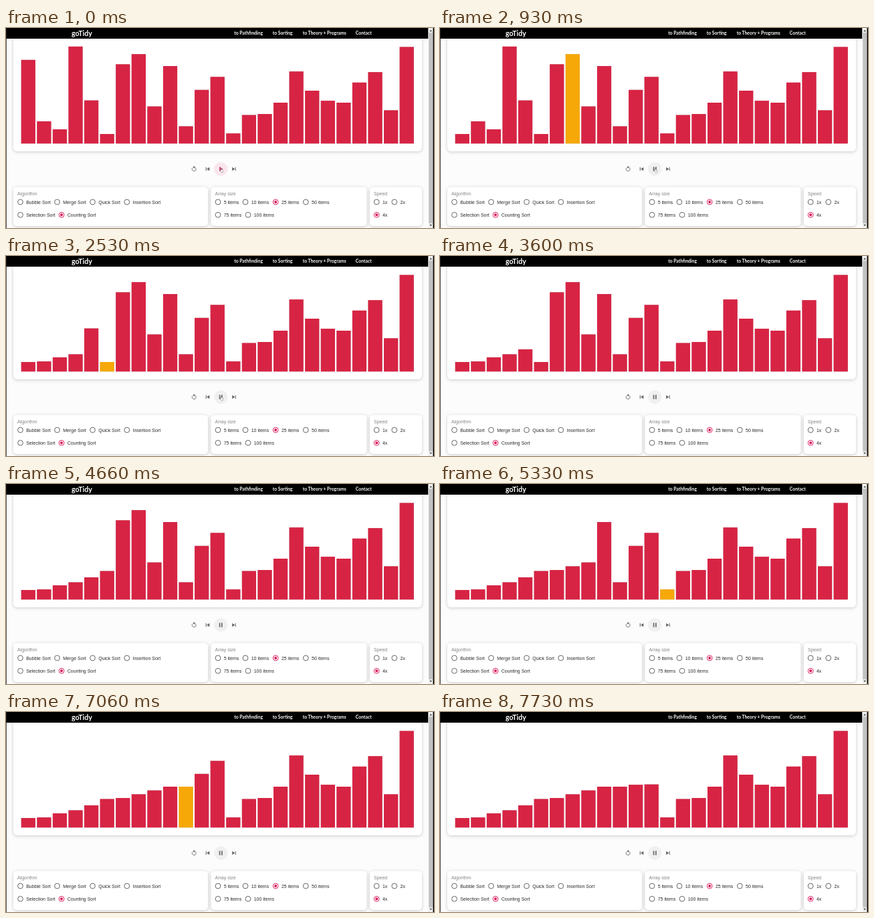
Write an HTML page that moves like this. It is 640 px wide and 300 px high and loops after 8000 ms.

```html
<!DOCTYPE html>
<html lang="en">
<head>
<meta charset="utf-8">
<title>Sorting visualizer</title>
<style>
  html, body { margin: 0; width: 100%; height: 100%; overflow: hidden; background: #fcfcfc; }
  svg { display: block; }
  text { font: 7px "Liberation Sans", Arial, sans-serif; fill: #2a2a2a; }
  .label { fill: #858585; }
  .nav text { font: 700 6.8px Lato, sans-serif; fill: #fff; text-anchor: middle; }
  .nav .brand { font-size: 10.6px; text-anchor: start; }
  .card { fill: #fff; filter: drop-shadow(0 1px 2.5px #0003); }
  .ring { fill: none; stroke: #555; stroke-width: .9; }
  .on { stroke: #d80d57; }
  .dot { fill: #d80d57; }
  .icon { fill: #666; }
  #bars { filter: drop-shadow(0 0 .6px #0004); }
</style>
</head>
<body>
<svg id="stage" width="640" height="300" viewBox="0 0 640 300">
  <rect class="card" x="11" y="-10" width="611" height="195" rx="6"/>
  <g id="bars"></g>

  <g class="nav">
    <rect width="631.5" height="16"/>
    <text class="brand" x="98" y="12">goTidy</text>
    <text x="362.6" y="10.3">to Pathfinding</text>
    <text x="413.7" y="10.3">to Sorting</text>
    <text x="476.2" y="10.3">to Theory + Programs</text>
    <text x="534.8" y="10.3">Contact</text>
  </g>

  <g class="icon">
    <path d="M279.2 209.4A3 3 0 1 0 281.6 208.7" fill="none" stroke="#666" stroke-width=".9"/>
    <path d="M282 206.7v4l-2.4-2z"/>
    <path d="M298.7 208.7h1v5.6h-1zM304.3 208.7v5.6l-4.2-2.8z"/>
    <path d="M342.7 208.7h1v5.6h-1zM338.2 208.7v5.6l4.2-2.8z"/>
  </g>
  <circle id="button" cx="321.2" cy="211.5" r="10.2"/>
  <path id="play" d="M319.3 208v7l5-3.5z" fill="#c42a58"/>
  <path id="pause" d="M318.7 208.2h1.8v6.6h-1.8zM322 208.2h1.8v6.6h-1.8z" fill="#707070"/>
  <path id="cursor" d="M321.2 210.6q.7-.6 1.1 0v2l2 .5q.6.3.4 1.2l-.5 2.2h-2.2l-1.8-2.4q.2-.7 1 0z"
        fill="#fff" stroke="#444" stroke-width=".4"/>

  <g id="options"></g>

  <rect width=".8" height="300" fill="#222"/>
  <rect x="631.5" width="7" height="300" fill="#f1f1f1"/>
  <rect x="632.3" y="7" width="5.6" height="286" fill="#c1c1c1"/>
  <path d="M633.2 5.2h4l-2-2.4zM633.2 294.8h4l-2 2.4z" fill="#505050"/>
  <rect x="638.5" width="1.5" height="300"/>
</svg>
<script>
const $ = id => document.getElementById(id);
const LOOP = 8000, TICKS_PER_MS = 0.015, BASE = 173.3, PITCH = 23.58;
const RED = '#d72444', ORANGE = '#f6a809';

// Top edge of each unsorted bar.
const tops = [47.8, 140, 152, 27.8, 108.6, 159, 54.4, 39.2, 117.6, 57.1, 147.4, 92.8, 73.3,
  158.1, 130.5, 129, 112, 65.2, 94, 109.1, 112, 81.8, 66.2, 123.4, 28.4];
const sorted = [...tops].sort((a, b) => b - a);
// Tick at which each sorted value is written back, from the left.
const writes = [6, 16, 24, 37, 44, 62, 71, 77, 85, 93, 106, 110, 114];
// Highlight sweeps: first bar, start tick, end tick.
const sweeps = [[0, 1, 7], [1, 11, 22], [2, 24, 36], [3, 37, 40], [4, 47, 54], [6, 62, 67],
  [7, 71, 74], [7, 77, 82], [8, 85, 86], [9, 93, 97], [10, 106, 109], [11, 110, 113], [12, 114, 116]];

function add(parent, tag, attrs, text = '') {
  const node = document.createElementNS('http://www.w3.org/2000/svg', tag);
  for (const key in attrs) node.setAttribute(key, attrs[key]);
  node.textContent = text;
  return parent.appendChild(node);
}

function card(x, width, title, choices) {
  const group = $('options');
  add(group, 'rect', { class: 'card', x, y: 238.5, width, height: 58.5, rx: 5 });
  add(group, 'text', { class: 'label', x: x + 6, y: 251 }, title);
  for (const [cx, row, name, on] of choices) {
    const cy = row ? 280.3 : 261;
    add(group, 'circle', { class: on ? 'ring on' : 'ring', cx, cy, r: 3.9 });
    if (on) add(group, 'circle', { class: 'dot', cx, cy, r: 2 });
    add(group, 'text', { x: cx + 8.7, y: cy + 2.6 }, name);
  }
}
card(11, 291, 'Algorithm', [[21.5, 0, 'Bubble Sort'], [76.5, 0, 'Merge Sort'], [129.5, 0, 'Quick Sort'],
  [180.8, 0, 'Insertion Sort'], [21.5, 1, 'Selection Sort'], [83, 1, 'Counting Sort', true]]);
card(306.5, 233, 'Array size', [[317, 0, '5 items'], [358, 0, '10 items'], [403.2, 0, '25 items', true],
  [448.3, 0, '50 items'], [317, 1, '75 items'], [362, 1, '100 items']]);
card(544, 78, 'Speed', [[554.2, 0, '1x'], [580.8, 0, '2x'], [554.2, 1, '4x', true]]);

const bars = tops.map((_, i) => add($('bars'), 'rect', { x: 22.7 + i * PITCH, width: 21.2 }));

function draw(now) {
  const tick = Math.floor((now % LOOP + 7) * TICKS_PER_MS);
  const sweep = sweeps.find(([, start, end]) => tick >= start && tick < end);
  const marked = sweep ? sweep[0] + 2 * (tick - sweep[1]) : -1;
  bars.forEach((bar, i) => {
    const top = tick >= writes[i] ? sorted[i] : tops[i];
    bar.setAttribute('y', top);
    bar.setAttribute('height', BASE - top);
    bar.setAttribute('fill', i === marked ? ORANGE : RED);
  });
  const running = tick > 0;
  $('button').setAttribute('fill', running ? '#f0f0f0' : '#f9e6ec');
  $('play').style.display = running ? 'none' : '';
  $('pause').style.display = running ? '' : 'none';
  $('cursor').style.display = tick < 47 ? '' : 'none';
}

const begin = performance.now();
(function frame() {
  draw(performance.now() - begin);
  requestAnimationFrame(frame);
})();
</script>
</body>
</html>
```
